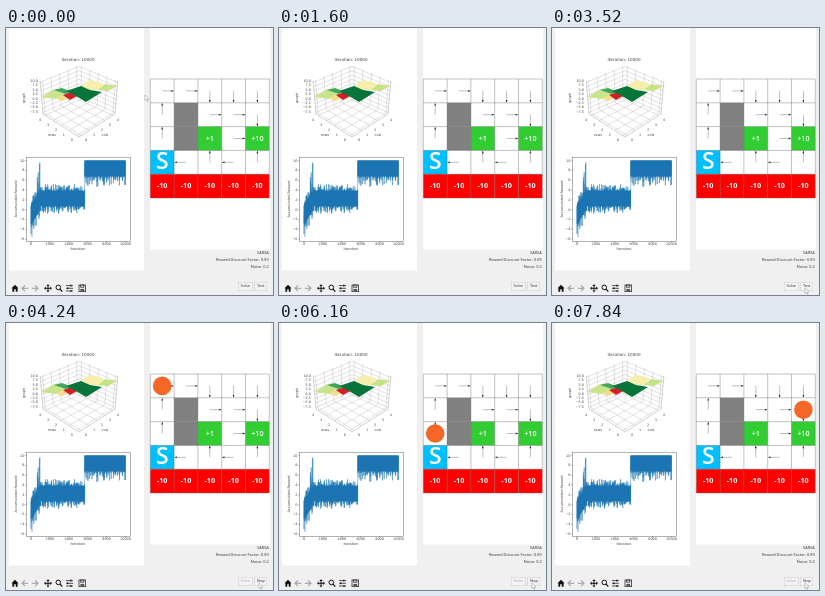
Write an HTML page with a canvas that moves like this. It is 267x267 px and loops after 8 s.

```html
<!DOCTYPE html>
<html>
<head>
<meta charset="utf-8">
<style>
html, body { margin: 0; width: 100%; height: 100%; overflow: hidden; background: #f0f0f0; }
canvas { display: block; width: 267px; height: 267px; }
</style>
</head>
<body>
<canvas id="stage"></canvas>
<script>
const LOOP = 8000, SIZE = 267;
const PLOT = '"DejaVu Sans", sans-serif', UI = '"Open Sans", sans-serif';
const canvas = document.getElementById('stage');
const dpr = window.devicePixelRatio || 1;
canvas.width = canvas.height = SIZE * dpr;
const base = document.createElement('canvas');
base.width = base.height = SIZE * dpr;
let g;

function rect(x, y, w, h, fill) {
  g.fillStyle = fill;
  g.fillRect(x, y, w, h);
}

function line(points, color = '#000', width = 0.5) {
  g.beginPath();
  points.forEach(p => g.lineTo(...p));
  g.strokeStyle = color;
  g.lineWidth = width;
  g.stroke();
}

function poly(points, fill, edge) {
  g.beginPath();
  points.forEach(p => g.lineTo(...p));
  g.closePath();
  g.fillStyle = fill;
  g.fill();
  if (edge) {
    g.strokeStyle = edge;
    g.lineWidth = 0.4;
    g.stroke();
  }
}

function text(str, x, y, size, font = PLOT, color = '#444', align = 'center', turn = 0, weight = 400) {
  g.save();
  g.translate(x, y);
  g.rotate(turn);
  g.font = `${weight} ${size}px ${font}`;
  g.fillStyle = color;
  g.textAlign = align;
  g.textBaseline = 'middle';
  g.fillText(str, 0, 0);
  g.restore();
}

function surfacePlot() {
  text('Iteration: 10000', 72, 32.3, 4.1);
  const left = [37, 86], front = [73, 109], right = [109, 86], back = [73, 70];
  // the box widens slightly towards the top
  const up = ([x, y], h = 33) => [73 + (x - 73) * (1 + h * 0.0024), y - h];
  const mix = (a, b, k) => [a[0] + (b[0] - a[0]) * k, a[1] + (b[1] - a[1]) * k];
  const gray = '#b4b4b4';
  for (let i = 0; i <= 4; i++) {
    const k = 0.06 + i * 0.22;
    const r = mix(front, left, k), c = mix(front, right, k);
    const rb = mix(right, back, k), cb = mix(left, back, k);
    line([r, rb, up(rb)], gray, 0.4);
    line([c, cb, up(cb)], gray, 0.4);
    text(i, r[0] - 5, r[1] + 4.6, 3.4);
    text(i, c[0] + 5, c[1] + 4.6, 3.4);
  }
  for (let i = 0; i < 8; i++) {
    const h = 1.5 + i * 4.3;
    line([up(left, h), up(back, h), up(right, h)], gray, 0.4);
    text((i * 2.5 - 7.5).toFixed(1).replace('-', '−'), 32, 84 - i * 4.4, 3.4, PLOT, '#444', 'right');
  }
  line([up(left), left, front, right, up(right)], '#888', 0.4);
  text('rows', 46, 107, 3.5);
  text('cols', 99, 107, 3.5);
  text('graph', 18, 70, 3.5, PLOT, '#444', 'center', -Math.PI / 2);

  poly([[75, 58], [83, 52], [97, 55], [94, 62], [84, 62]], '#f6eeaa');
  poly([[92, 62], [99, 56], [111, 58], [102, 63]], '#c5e285');
  poly([[35, 69], [49, 61], [62, 64], [50, 71]], '#c9e48a');
  poly([[48, 62], [56, 60], [66, 64], [60, 66]], '#3fa75a');
  poly([[50, 71], [59, 66], [63, 69], [57, 73]], '#f7dc8a');
  poly([[57, 67], [66, 64], [73, 67], [64, 72]], '#d0202a');
  poly([[60, 63], [75, 58], [84, 62], [96, 64], [80, 74], [70, 68]], '#07743a');
}

function rewardPlot() {
  let seed = 7;
  const rnd = () => (seed = seed * 16807 % 2147483647) / 2147483647;
  const blue = '#1f77b4', spots = [];
  for (let x = 25; x < 119.6; x += 0.2) {
    const high = rnd() ** 5, deep = rnd() ** 5;
    let top, low;
    if (x < 34) {
      const rise = (x - 25) * 1.6;
      top = 178 - rise - high * (x > 30 ? 30 : 10);
      low = 196 - rise + deep * 15;
    } else if (x < 78.8) {
      top = 163 - high * 7;
      low = 178 + deep * 8;
    } else {
      top = 132.7;
      low = 148 + deep * 11;
    }
    spots.push([x, top], [x, low]);
  }
  line(spots, blue, 0.45);
  line([[33.4, 180], [33.4, 136]], blue, 0.6);
  line([[26, 175], [26, 209]], blue, 0.6);
  g.strokeStyle = '#555';
  g.lineWidth = 0.45;
  g.strokeRect(20.3, 129.2, 104, 84.2);
  for (let v = -6; v <= 10; v += 2) {
    const y = 181.7 - v * 4.9;
    line([[19, y], [20.5, y]], '#555', 0.4);
    text(String(v).replace('-', '−'), 18.4, y, 3.4, PLOT, '#444', 'right');
  }
  for (let i = 0; i <= 5; i++) {
    const x = 25 + i * 18.9;
    line([[x, 213.4], [x, 214.8]], '#555', 0.4);
    text(i * 2000, x, 216.3, 3.4);
  }
  text('Iteration', 72, 220.7, 3.5);
  text('Accumulated Reward', 10, 171, 3.5, PLOT, '#444', 'center', -Math.PI / 2);
}

const STEP = 23.8;
const at = (c, r) => [144.3 + STEP * (c + 0.5), 51 + STEP * (r + 0.5)];
const DIRS = { R: [1, 0], L: [-1, 0], U: [0, -1], D: [0, 1] };
const POLICY = ['RRDDD', 'U.RRD', 'U..R.', '.LULU'];

function arrow([x, y], [dx, dy]) {
  const ex = x + dx * 11.5, ey = y + dy * 11.5;
  line([[x, y], [ex, ey]], '#444', 0.35);
  const bx = ex - dx * 2.4, by = ey - dy * 2.4;
  poly([[ex, ey], [bx + dy * 0.9, by + dx * 0.9], [bx - dy * 0.9, by - dx * 0.9]], '#222');
}

function cell(c, r, fill, label, size, weight) {
  const [x, y] = at(c, r);
  rect(x - STEP / 2, y - STEP / 2, STEP, STEP, fill);
  if (label) text(label, x, y + size * 0.03, size, UI, '#fff', 'center', 0, weight);
}

function hatch(c, r) {
  cell(c, r, '#8f8f8f');
  const [cx, cy] = at(c, r), h = STEP / 2;
  g.save();
  g.beginPath();
  g.rect(cx - h, cy - h, STEP, STEP);
  g.clip();
  for (let d = -STEP; d < STEP; d += 1.6)
    line([[cx - h + d, cy - h], [cx + h + d, cy + h]], '#606060', 0.5);
  g.restore();
}

function world() {
  hatch(1, 1);
  hatch(1, 2);
  cell(2, 2, '#32cd32', '+1', 7.2, 600);
  cell(4, 2, '#32cd32', '+10', 7.2, 600);
  cell(0, 3, '#00bfff', 'S', 23, 600);
  for (let c = 0; c < 5; c++) cell(c, 4, '#ff0000', '-10', 7.2, 700);
  for (let i = 0; i <= 5; i++) {
    const [x, y] = at(i - 0.5, i - 0.5);
    line([[144.3, y], [263.3, y]], '#666', 0.4);
    line([[x, 51], [x, 170]], '#666', 0.4);
  }
  POLICY.forEach((row, r) => [...row].forEach((d, c) => DIRS[d] && arrow(at(c, r), DIRS[d])));
}

function toolbar() {
  const ink = '#111', dim = '#a0a0a0', y = 260.3;
  poly([[5.5, y], [9, y - 3.6], [12.5, y], [11.6, y], [11.6, y + 3.4], [9.8, y + 3.4], [9.8, y + 1], [8.2, y + 1], [8.2, y + 3.4], [6.4, y + 3.4], [6.4, y]], ink);
  for (const [x, s] of [[19, -1], [29, 1]]) {
    line([[x - s * 3.2, y], [x + s * 2.8, y]], dim, 1.1);
    line([[x, y - 2.9], [x + s * 3, y], [x, y + 2.9]], dim, 1.1);
  }
  for (const [dx, dy] of Object.values(DIRS)) {
    const tip = [42 + dx * 4, y + dy * 4], bx = 42 + dx * 2.2, by = y + dy * 2.2;
    line([[42, y], [bx, by]], ink, 1);
    poly([tip, [bx + dy * 1.7, by + dx * 1.7], [bx - dy * 1.7, by - dx * 1.7]], ink);
  }
  g.beginPath();
  g.arc(52.3, y - 0.9, 2.3, 0, 7);
  g.strokeStyle = ink;
  g.lineWidth = 1;
  g.stroke();
  line([[54, y + 0.8], [56.3, y + 3.3]], ink, 1.3);
  [64.8, 61.8, 65].forEach((x, i) => {
    const ly = y - 2.7 + i * 2.7;
    line([[60, ly], [67, ly]], ink, 0.7);
    rect(x - 0.6, ly - 0.9, 1.2, 1.8, ink);
  });
  g.strokeStyle = '#333';
  g.lineWidth = 0.8;
  g.strokeRect(73, y - 3.3, 6.6, 6.6);
  g.strokeRect(74.6, y - 3.3, 3.2, 2.2);
  rect(74.4, y + 0.6, 3.8, 2.4, '#555');
}

function drawBase() {
  g = base.getContext('2d');
  g.scale(dpr, dpr);
  rect(0, 0, SIZE, SIZE, '#f0f0f0');
  rect(3, 0, 135, 242.5, '#fff');
  rect(144, 0, 120, 221.5, '#fff');
  surfacePlot();
  rewardPlot();
  world();
  toolbar();
  ['SARSA', 'Reward Discount Factor: 0.89', 'Noise: 0.2'].forEach((s, i) =>
    text(s, 262.7, 225.3 + i * 7, 3.9, UI, '#333', 'right'));
}

function button(label, x, w, color) {
  rect(x, 254, w, 9, '#c4c4c4');
  rect(x + 0.4, 254.4, w - 0.8, 8.2, '#f3f3f3');
  text(label, x + w / 2, 258.2, 3.9, UI, color);
}

function pointer(x, y) {
  const shape = [[0, 0], [0, 5.4], [1.3, 4.3], [2.2, 6.3], [3, 5.9], [2.2, 4], [3.9, 3.8]];
  poly(shape.map(([a, b]) => [x + a, y + b]), '#fff', '#777');
}

// [start time, column, row]; no column means the agent is off the board
const MOVES = [
  [0], [3600, 0, 3], [3840, 0, 2], [4080, 0, 1], [4240, 0, 0], [4320, 1, 0], [4480, 2, 0],
  [4640, 2, 1], [4800, 3, 1], [4960, 4, 1], [5120, 4, 2], [5760], [5920, 0, 3], [6160, 0, 2],
  [6320, 0, 1], [6560, 0, 0], [6720, 0, 1], [6880, 0, 0], [7120, 1, 0], [7280, 2, 0],
  [7520, 2, 1], [7680, 3, 1], [7840, 4, 1]
];

function glide(t, start, end, a, b) {
  const k = Math.min(1, Math.max(0, (t - start) / (end - start)));
  const e = k * k * (3 - 2 * k);
  pointer(a[0] + (b[0] - a[0]) * e, a[1] + (b[1] - a[1]) * e);
}

function draw(t) {
  g = canvas.getContext('2d');
  g.setTransform(1, 0, 0, 1, 0, 0);
  g.drawImage(base, 0, 0);
  g.scale(dpr, dpr);

  const running = t >= 3600 && t < 5280 || t >= 5920;
  button('Solve', 232, 14.5, running ? '#aaa' : '#333');
  button(running ? 'Stop' : 'Test', 248.5, 12.5, '#222');

  const [, c, r] = MOVES.findLast(m => m[0] <= t);
  if (c !== undefined) {
    const [x, y] = at(c, r);
    g.beginPath();
    g.arc(x, y, 9.3, 0, 7);
    g.fillStyle = '#f56726';
    g.fill();
  }

  if (t < 960) glide(t, 80, 960, [139, 67], [215, 231]);
  else if (t >= 1840) glide(t, 1840, 2880, [215, 231], [253, 260]);
}

drawBase();
function tick() {
  draw(performance.now() % LOOP);
  requestAnimationFrame(tick);
}
tick();
</script>
</body>
</html>
```
